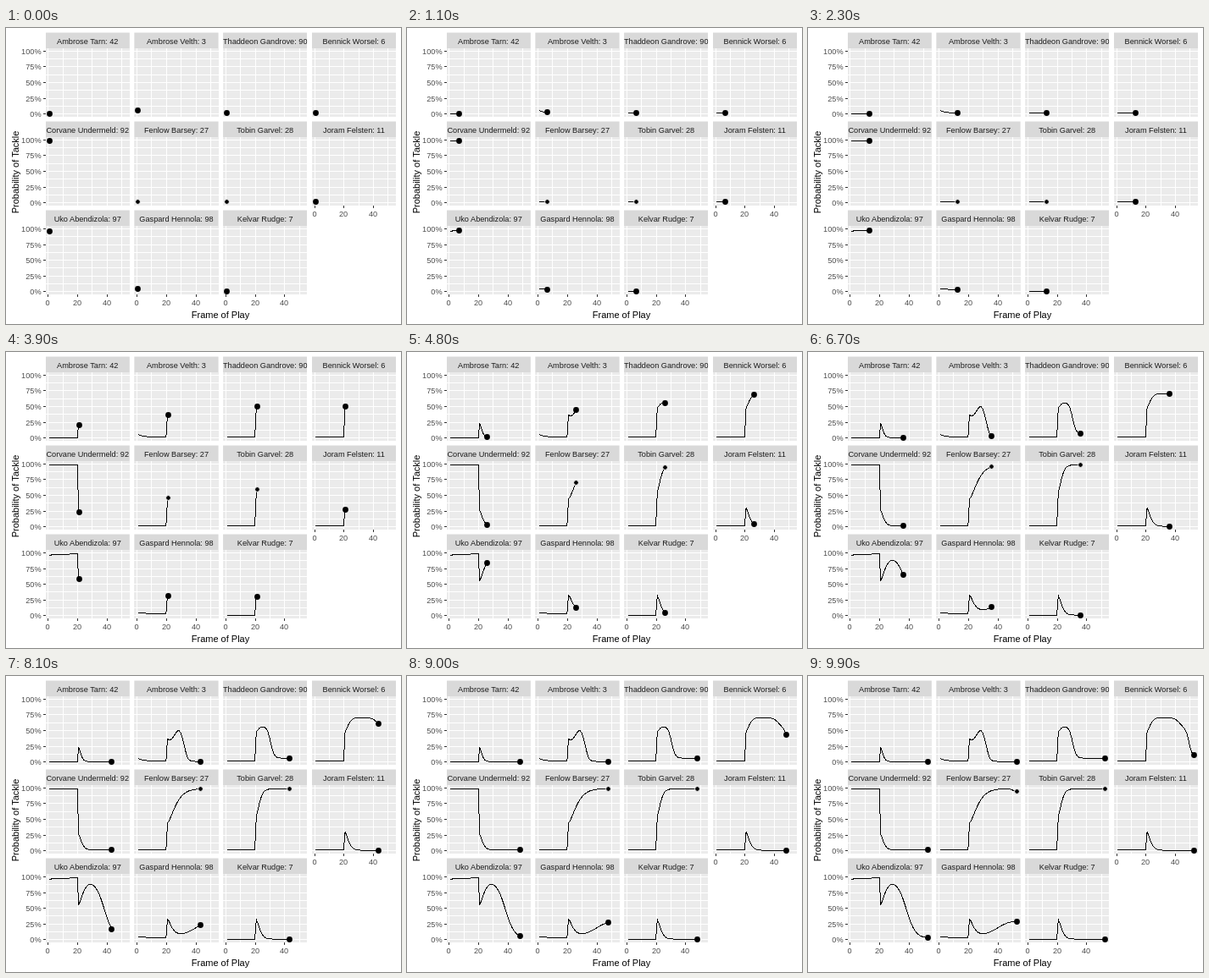
An HTML page for the animation above (10 s loop, 466 by 350 pixels).

```html
<!DOCTYPE html>
<html lang="en">
<head>
<meta charset="utf-8">
<title>Probability of Tackle</title>
<style>
  html, body { margin: 0; width: 100%; height: 100%; overflow: hidden; background: #fff; }
  svg { display: block; }
  text { font: 9.2px "Liberation Sans", Arial, sans-serif; text-anchor: middle; fill: #4d4d4d; }
  .label { fill: #1a1a1a; }
  .title { font-size: 11px; fill: #000; }
  .y { text-anchor: end; }
  rect, line, polyline { shape-rendering: crispEdges; }
  .grid { stroke: #fff; }
  .tick { stroke: #333; }
  polyline { fill: none; stroke: #000; stroke-linejoin: round; }
</style>
</head>
<body>
<svg id="chart" width="466" height="350" viewBox="0 0 466 350"></svg>
<script>
const STEP = 100, STEPS = 100, LAST = 53, SNAP = 21;
const LEFT = 46.6, TOP = 24, WIDTH = 99.25, HEIGHT = 81, STRIP = 18.6;
const PITCH_X = 104.75, PITCH_Y = 105.03;
const chart = document.getElementById('chart');
const panels = [];

function add(parent, tag, attrs, text) {
  const node = document.createElementNS('http://www.w3.org/2000/svg', tag);
  for (const key in attrs) node.setAttribute(key, attrs[key]);
  if (text !== undefined) node.textContent = text;
  parent.appendChild(node);
  return node;
}

const lineAt = (cls, x1, y1, x2, y2) => add(chart, 'line', { class: cls, x1, y1, x2, y2 });
const pixel = v => Math.floor(v) + 0.5;

// Building blocks for the curves, in percent over play frames.
const settle = (f, from, to, span) => to + (from - to) * Math.exp(-(((f - SNAP) / span) ** 1.4));
const fall = (f, middle, width) => 1 / (1 + Math.exp((f - middle) / width));
const rise = (f, middle, width) => 1 - fall(f, middle, width);
const bump = (f, middle, width) => Math.exp(-(((f - middle) / width) ** 2));

function addPanel(label, before, after, hollow = false) {
  const col = panels.length % 4, row = Math.floor(panels.length / 4);
  const left = LEFT + col * PITCH_X, top = TOP + row * PITCH_Y, bottom = top + HEIGHT;
  const x = frame => left + 4.5 + (frame - 1) * 1.735;
  const y = percent => top + 77.6 - percent * 0.742;

  const strip = add(chart, 'svg', { x: left, y: top - STRIP, width: WIDTH, height: STRIP, overflow: 'hidden' });
  add(strip, 'rect', { width: WIDTH, height: STRIP, fill: '#d9d9d9' });
  add(strip, 'text', { class: 'label', x: WIDTH / 2, y: 13.4 }, label);
  add(chart, 'rect', { x: left, y: top, width: WIDTH, height: HEIGHT, fill: '#ebebeb' });

  for (let p = 0; p <= 100; p += 12.5) {
    const gy = pixel(y(p));
    lineAt('grid', left, gy, left + WIDTH, gy);
    if (col === 0 && p % 25 === 0) {
      lineAt('tick', left - 3, gy, left, gy);
      add(chart, 'text', { class: 'y', x: 41.6, y: gy + 3.3 }, p + '%');
    }
  }
  const hasAxis = row === 2 || (row === 1 && col === 3);
  for (let f = 0; f <= 50; f += 10) {
    const gx = pixel(x(f) + 0.5);
    lineAt('grid', gx, top, gx, bottom);
    if (hasAxis && f % 20 === 0) {
      lineAt('tick', gx, bottom, gx, bottom + 3);
      add(chart, 'text', { x: gx - 0.4, y: bottom + 13.2 }, f);
    }
  }
  panels.push({
    x, y,
    valueAt: f => f < SNAP ? before(f) : after(f),
    line: add(chart, 'polyline', {}),
    dot: add(chart, 'circle', hollow ? { r: 2.9, stroke: '#fff' } : { r: 3.4 })
  });
}

const flat = v => () => v;

addPanel('Ambrose Tarn: 42', flat(0.3), f => settle(f, 23.5, 0.5, 2));
addPanel('Ambrose Velth: 3', f => 1.2 + 4.3 * Math.exp((1 - f) / 4),
  f => 0.7 + (settle(f, 36, 32, 1) + 18 * bump(f, 28.8, 4)) * fall(f, 33, 1.1));
addPanel('Thaddeon Gandrove: 90', flat(1.5), f => 6 + settle(f, 42, 51, 2) * fall(f, 30.7, 1.2));
addPanel('Bennick Worsel: 6', flat(1.5),
  f => 9 + (settle(f, 39, 62, 3) - 20 * rise(f, 43.5, 2)) * fall(f, 49.6, 1));
addPanel('Corvane Undermeld: 92', flat(99), f => settle(f, 26, 1.5, 2.6));
addPanel('Fenlow Barsey: 27', flat(1), f => settle(f, 44, 98.7, 7) - 4.5 * rise(f, 50.5, 1), true);
addPanel('Tobin Garvel: 28', flat(2), f => settle(f, 55, 98.5, 2.9), true);
addPanel('Joram Felsten: 11', flat(1), f => settle(f, 30, 0.7, 3.1));
addPanel('Uko Abendizola: 97', f => 96.3 + f / 9, f => 2 + settle(f, 54, 93, 4) * fall(f, 38.4, 3.1));
addPanel('Gaspard Hennola: 98', f => 4 - f / 14, f => settle(f, 33, 7, 3.6) + 23 * rise(f, 40, 4));
addPanel('Kelvar Rudge: 7', flat(0.8), f => settle(f, 32, 0.8, 3.1));

add(chart, 'text', { class: 'title', x: 253, y: 343 }, 'Frame of Play');
add(chart, 'text', { class: 'title', transform: 'translate(14.6 170.5) rotate(-90)' }, 'Probability of Tackle');

function render(time) {
  const step = Math.floor(time / STEP) % STEPS;
  const now = 1 + (LAST - 1) * step / (STEPS - 1);
  const whole = Math.floor(now), part = now - whole;
  for (const { x, y, valueAt, line, dot } of panels) {
    const value = valueAt(whole) * (1 - part) + valueAt(whole + 1) * part;
    const points = [];
    for (let f = 1; f <= whole; f++) points.push([x(f), y(valueAt(f))]);
    points.push([x(now), y(value)]);
    line.setAttribute('points', points.join(' '));
    dot.setAttribute('cx', pixel(x(now)));
    dot.setAttribute('cy', pixel(y(value)));
  }
}

const begin = performance.now();
function tick() {
  render(performance.now() - begin);
  requestAnimationFrame(tick);
}
tick();
</script>
</body>
</html>
```
